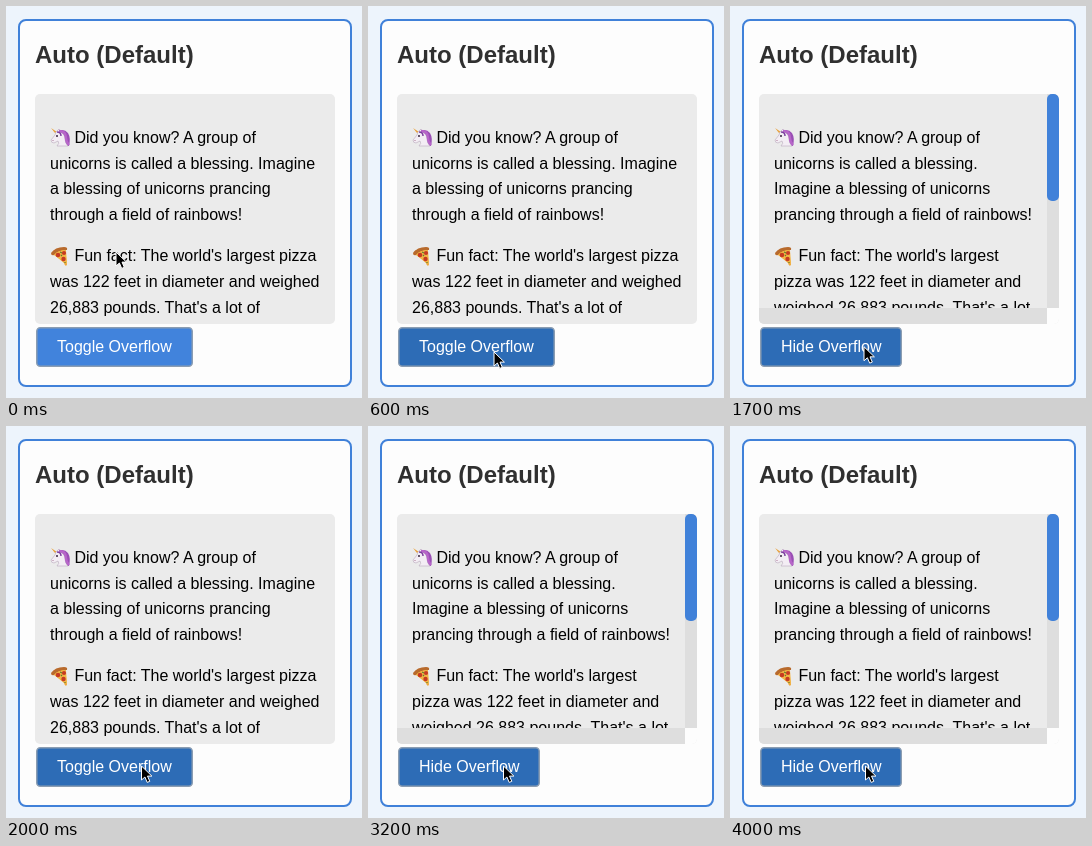
An HTML page for the animation above (4.6 s loop, 356 by 392 pixels).

```html
<!DOCTYPE html>
<html lang="en">
<head>
<meta charset="utf-8">
<title>Overflow toggle</title>
<style>
  html, body { margin: 0; width: 100%; height: 100%; overflow: hidden; background: #edf4fc; }
  svg { display: block; width: 100%; height: 100%; }
  text { font-family: "Liberation Sans", Arial, sans-serif; font-size: 16px; }
  .title { font-size: 24px; font-weight: bold; fill: #303030; }
</style>
</head>
<body>
<svg viewBox="0 0 356 392">
  <defs>
    <clipPath id="box"><rect x="29" y="88" width="300" height="230" rx="5"/></clipPath>
    <clipPath id="inner"><rect id="view" x="29" y="88" width="300" height="230"/></clipPath>
  </defs>
  <rect width="356" height="392" fill="#edf4fc"/>
  <rect x="13" y="14" width="332" height="366" rx="7" fill="#fdfdfd" stroke="#4081d9" stroke-width="2"/>
  <text class="title" x="29" y="57">Auto (Default)</text>

  <g clip-path="url(#box)">
    <rect x="29" y="88" width="300" height="230" fill="#ebebeb"/>
    <g clip-path="url(#inner)">
      <g id="lines"></g>
      <g id="unicorn" transform="translate(44 121)">
        <path d="M5 6 1 1 7 5Z" fill="#e8a13c"/>
        <path d="M8 4Q14 1 18 6Q21 11 19 19L10 19Q13 14 9 11Z" fill="#9a4fb5"/>
        <path d="M6 5 9 2 10 5Q15 7 15 12Q15 16 18 19L7 19Q10 16 8 14L4 16Q1 16 1 13L5 8Z" fill="#f3edf4" stroke="#b9a9bd" stroke-width=".6"/>
        <path d="M9 4Q16 4 16 11Q16 15 19 18" fill="none" stroke="#b765c9" stroke-width="2.4"/>
        <path d="M7 5Q11 5 11 9" fill="none" stroke="#7d3fa0" stroke-width="1.5"/>
        <circle cx="7" cy="9" r="1" fill="#33243d"/>
        <circle cx="3" cy="13.5" r=".6" fill="#a06a8a"/>
      </g>
      <g id="pizza" transform="translate(44 240)">
        <path d="M2 7 15 2 17 19Q15 21 14 17Z" fill="#eda83a"/>
        <path d="M1 7Q5 1 14 1Q18 1 17 4Q8 4 4 9Q1 10 1 7Z" fill="#b86a2c"/>
        <path d="M4 9Q8 4 16 4L17 18Z" fill="#f2b545"/>
        <g fill="#c63a22">
          <circle cx="8" cy="9" r="2.3"/>
          <circle cx="14" cy="7" r="2.1"/>
          <circle cx="13.5" cy="13" r="2.2"/>
        </g>
        <path d="M10 6 12 7M11 10 12 9M15 16V17" stroke="#5f7d2c" stroke-width="1.2"/>
      </g>
    </g>
    <g id="bars">
      <rect x="317" y="88" width="12" height="230" fill="#fdfdfd"/>
      <rect x="29" y="302" width="288" height="16" fill="#dedede"/>
      <rect x="317" y="88" width="12" height="214" fill="#dedede"/>
      <rect x="317" y="88" width="12" height="107" rx="5" fill="#4081d9"/>
    </g>
  </g>

  <rect id="button" x="30.75" y="321.75" height="38.5" rx="3.5" stroke="#8b9db2" stroke-width="1.5"/>
  <text id="label" x="51" y="346" fill="#fff"></text>
  <path id="cursor" d="M0 0V14L3.4 11 5.7 16.4 8.3 15.3 6 10.1H10.4Z" fill="#000" stroke="#fff" stroke-width="1" stroke-linejoin="round"/>
</svg>
<script>
const LOOP = 4600, STEP = 100;
const FLIPS = [1100, 2000, 3200, 3700, 4000];
// Pointer stops: time, x, y
const PATH = [[0, 110, 246], [600, 126, 346], [1100, 132.5, 341.5], [1400, 132.5, 341.5], [2000, 135.5, 340]];
const LIGHT = [65, 131, 220], DARK = [45, 108, 182];

const STATES = [
  {
    label: "Toggle Overflow", width: 155.5,
    lines: ["Did you know? A group of", "unicorns is called a blessing. Imagine",
      "a blessing of unicorns prancing", "through a field of rainbows!",
      "Fun fact: The world's largest pizza", "was 122 feet in diameter and weighed",
      "26,883 pounds. That's a lot of"]
  },
  {
    label: "Hide Overflow", width: 140.5,
    lines: ["Did you know? A group of", "unicorns is called a blessing.",
      "Imagine a blessing of unicorns", "prancing through a field of rainbows!",
      "Fun fact: The world's largest", "pizza was 122 feet in diameter and",
      "weighed 26,883 pounds. That's a lot"]
  }
];

const $ = id => document.getElementById(id);
const clamp = v => Math.min(1, Math.max(0, v));
const mix = (a, b, p) => a + (b - a) * p;
const ease = p => p * p * (3 - 2 * p);

const rows = STATES[0].lines.map((_, i) => {
  const row = document.createElementNS("http://www.w3.org/2000/svg", "text");
  row.setAttribute("x", i % 4 ? 44 : 68.4);
  row.setAttribute("y", Math.round(137 + i * 25.6 + (i > 3 ? 16 : 0)));
  return $("lines").appendChild(row);
});

let shown = -1;
function setState(n) {
  if (n === shown) return;
  shown = n;
  const s = STATES[n];
  rows.forEach((row, i) => row.textContent = s.lines[i]);
  $("label").textContent = s.label;
  $("button").setAttribute("width", s.width);
  $("bars").setAttribute("visibility", n ? "visible" : "hidden");
  $("view").setAttribute("width", n ? 288 : 300);
  $("view").setAttribute("height", n ? 214 : 230);
}

function pointer(t) {
  const i = PATH.findIndex(p => p[0] > t);
  if (i < 0) return PATH[PATH.length - 1].slice(1);
  const [a, b] = [PATH[i - 1], PATH[i]];
  const p = ease((t - a[0]) / (b[0] - a[0]));
  return [mix(a[1], b[1], p), mix(a[2], b[2], p)];
}

function draw(t) {
  setState(FLIPS.filter(f => t >= f).length % 2);
  $("cursor").setAttribute("transform", `translate(${pointer(t)})`);
  const hover = clamp((t - 400) / 200);
  $("button").setAttribute("fill", `rgb(${LIGHT.map((c, i) => Math.round(mix(c, DARK[i], hover)))})`);
}

const start = performance.now();
function tick() {
  const t = (performance.now() - start) % LOOP;
  draw(Math.floor(t / STEP) * STEP);
  requestAnimationFrame(tick);
}
tick();
</script>
</body>
</html>
```
